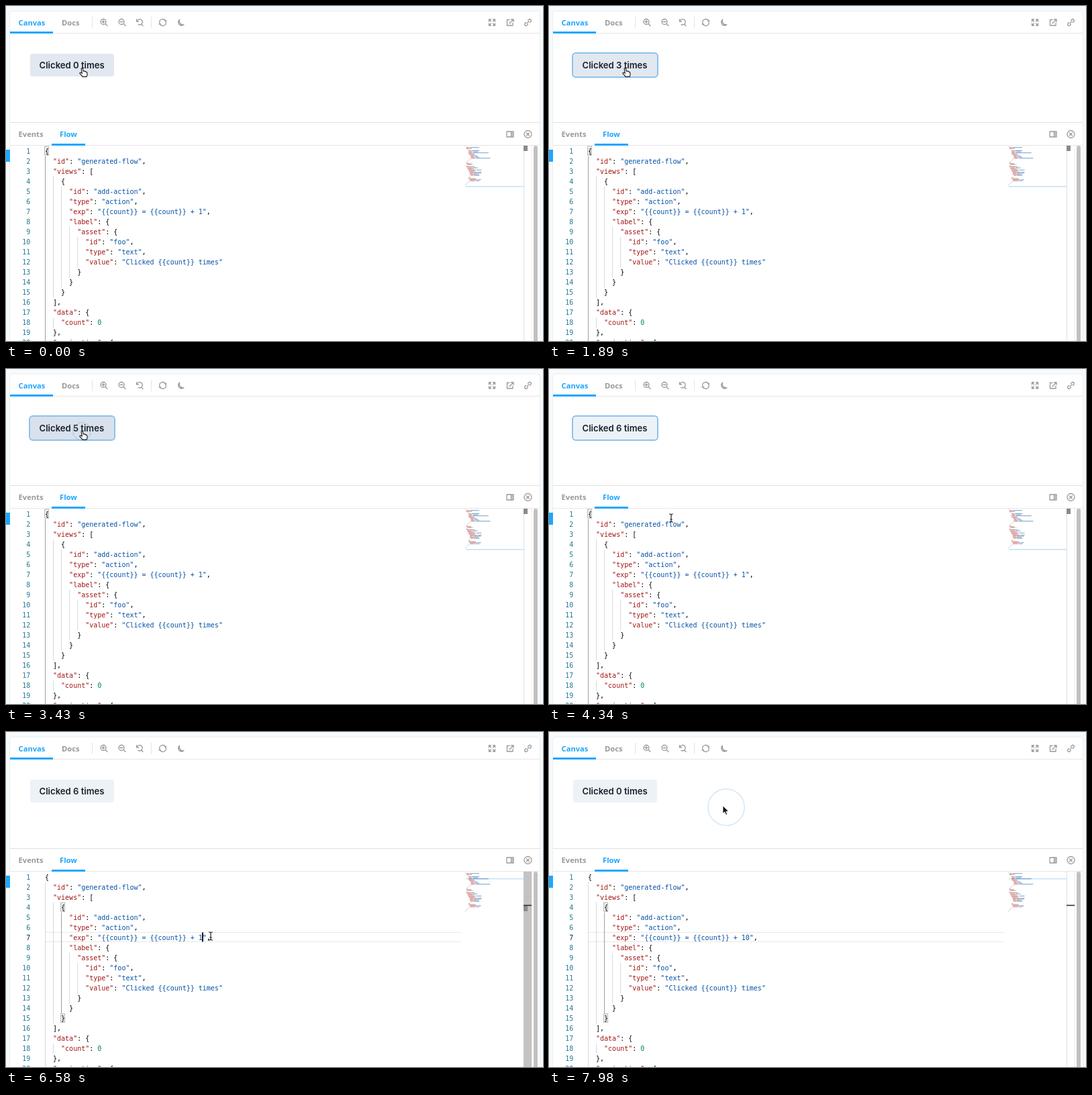
Write an HTML page that moves like this. It is 800 px wide and 499 px high and loops after 8000 ms.

```html
<!DOCTYPE html>
<html lang="en">
<head>
<meta charset="utf-8">
<title>Flow editor</title>
<style>
  html, body { margin: 0; width: 100%; height: 100%; overflow: hidden; background: #f6fafd; }
  svg { display: block; }
  .tab { font: 700 11.2px "Open Sans", sans-serif; fill: #999; }
  .on { fill: #1ea7fd; }
  .label { font: 600 13.1px Inter, sans-serif; fill: #1a202c; }
  .code { font: 10px "DejaVu Sans Mono", monospace; fill: #000; }
  .num { text-anchor: end; fill: #237893; }
  .icon { fill: none; stroke: #999; stroke-width: 1.3; stroke-linecap: round; stroke-linejoin: round; }
</style>
</head>
<body>
<svg id="stage" width="800" height="499" viewBox="0 0 800 499"></svg>
<script>
const LOOP = 8000, CH = 6.02, ROW = 15.05, LEFT = 58, TOP = 208.5;
const PRESSES = [370, 970, 1540, 2170, 2770, 3372];
const CARET_PRESS = 5309, BLUR_PRESS = 7657, TYPED = 6720, RESET = 6860;
const COLORS = { key: '#a31515', str: '#0451a5', num: '#098658', punct: '#000' };

const SOURCE = `{
  "id": "generated-flow",
  "views": [
    {
      "id": "add-action",
      "type": "action",
      "exp": "{{count}} = {{count}} + 1",
      "label": {
        "asset": {
          "id": "foo",
          "type": "text",
          "value": "Clicked {{count}} times"
        }
      }
    }
  ],
  "data": {
    "count": 0
  },
  "navigation": {
    "BEGIN": "FLOW_1",
    "FLOW_1": {
      "startState": "VIEW_1",
      "VIEW_1": {
        "state_type": "VIEW",
        "ref": "add-action",
        "transitions": {
          "*": "END_Done"
        }
      },
      "END_Done": {
        "state_type": "END",
        "outcome": "done"
      }
    }
  }
}`.split('\n');

const stage = document.getElementById('stage');

function add(tag, attrs, parent = stage, text) {
  const el = document.createElementNS('http://www.w3.org/2000/svg', tag);
  for (const k in attrs) el.setAttribute(k, attrs[k]);
  if (text !== undefined) el.textContent = text;
  parent.appendChild(el);
  return el;
}
const rect = (x, y, width, height, fill, more, parent) =>
  add('rect', { x, y, width, height, fill, ...more }, parent);
const write = (x, y, cls, text, parent) => add('text', { x, y, class: cls }, parent, text);
const group = (attrs = {}) => add('g', attrs);
const show = (el, on) => el.setAttribute('visibility', on ? 'visible' : 'hidden');
const icon = (x, y, d) => add('path', { d, class: 'icon', transform: `translate(${x} ${y})` });

// Panel, toolbar and tabs
rect(5.5, 7.5, 790, 500, '#fff', { rx: 4, stroke: '#e9eef2' });
rect(6, 40, 789, 1, '#e6e6e6');
rect(6, 173, 789, 1, '#e0e0e0');
rect(6, 207, 789, 1, '#e6e6e6');
rect(0, 214, 6, 18, '#1ea7fd');
rect(6, 38, 64, 3, '#1ea7fd');
rect(68, 205, 50, 3, '#1ea7fd');
write(18.5, 28.5, 'tab on', 'Canvas');
write(83, 28.5, 'tab', 'Docs');
write(18.5, 195, 'tab', 'Events');
write(80, 195, 'tab on', 'Flow');
rect(128, 16, 1, 17, '#e4e4e4');
rect(216, 16, 1, 17, '#e4e4e4');

const LENS = 'M3 -1A4 4 0 1 1 -5 -1A4 4 0 1 1 3 -1M2 2L5 5M-3 -1H1';
icon(146, 24.5, LENS + 'M-1 -3V1');
icon(173, 24.5, LENS);
icon(199, 24.5, 'M-4.5 -4.5V-1.5H-1.5M-4 -2A4.2 4.2 0 1 1 -2 3M2.5 2.5L5 5');
icon(233.5, 24.5, 'M-4.5 1A4.5 4.5 0 0 1 3.8 -2.4M4.5 -1A4.5 4.5 0 0 1 -3.8 2.4M5.5 -2.5L3.6 -2.2L3.2 -4M-5.5 2.5L-3.6 2.2L-3.2 4');
icon(260, 25, 'M-1.5 -4.8A5 5 0 1 0 5 2.8A5.6 5.6 0 0 1 -1.5 -4.8Z');
icon(724, 24.5, 'M-4.5 -1.5V-4.5H-1.5M1.5 -4.5H4.5V-1.5M4.5 1.5V4.5H1.5M-1.5 4.5H-4.5V1.5M-4 -4L-1.5 -1.5M4 -4L1.5 -1.5M4 4L1.5 1.5M-4 4L-1.5 1.5');
icon(751, 24.5, 'M-1 -4H-4.5V4.5H4V1M1.5 -4.5H5V-1M5 -4.5L-1 1.5');
icon(777.5, 24.5, 'M-1.5 1.5L1.5 -1.5M0 -3L1.7 -4.5A2 2 0 0 1 4.5 -1.7L3 0M0 3L-1.7 4.5A2 2 0 0 1 -4.5 1.7L-3 0');
icon(751, 191, 'M-5 -4H5V4H-5ZM1.5 -4V4M3 -2H3.6M3 0H3.6M3 2H3.6');
icon(777.5, 191, 'M5.5 0A5.5 5.5 0 1 1 -5.5 0A5.5 5.5 0 1 1 5.5 0M-2 -2L2 2M2 -2L-2 2');

// Button
const focusRing = rect(34, 69, 129, 38, '#8ec2ed', { rx: 6 });
const button = rect(36, 71, 125, 34, '#edf2f7', { rx: 4 });
const label = write(49.5, 93, 'label', '');

// Editor decorations
const rowTop = n => TOP + (n - 1) * ROW;
const lineBox = group();
rect(LEFT, 298, 620, 1, '#e8e8e8', {}, lineBox);
rect(LEFT, 312, 620, 1, '#e8e8e8', {}, lineBox);

const guide = (col, from, to, fill = '#d8d8d8', parent) =>
  rect(LEFT + col * CH, rowTop(from), 1, (to - from + 1) * ROW, fill, {}, parent);
guide(0, 2, 20);
guide(2, 4, 15);
guide(4, 5, 14);
guide(6, 9, 13);
guide(8, 10, 12);
guide(2, 18, 18);

function match(col, line, parent) {
  rect(LEFT + col * CH - .5, rowTop(line) + .5, 6, 13, '#e8efe8', { stroke: '#b9b9b9' }, parent);
}
const outer = group(), inner = group();
guide(0, 2, 20, '#a0a0a0', outer);
match(0, 1, outer);
guide(4, 5, 14, '#a0a0a0', inner);
match(4, 4, inner);
match(4, 15, inner);

// Code and minimap
const miniLine = rect(685, 268, 86, 1.6, '#c5e2f8');
const numbers = [];
let expValue;

function tokens(line) {
  return line.trim().match(/"[^"]*"(?=:)|"[^"]*"|\d+|[^"\d]+/g).map((text, i, all) => {
    const quoted = text[0] === '"';
    const kind = quoted ? (all[i + 1] || '')[0] === ':' ? 'key' : 'str'
      : /\d/.test(text) ? 'num' : 'punct';
    return { text, kind };
  });
}

SOURCE.forEach((line, i) => {
  let col = line.search(/\S/);
  const visible = i < 20, y = rowTop(i + 1) + 11;
  const row = visible && write(LEFT + col * CH, y, 'code', '');
  if (visible) numbers.push(write(36.3, y, 'code num', i + 1));
  for (const { text, kind } of tokens(line)) {
    if (visible) {
      const span = add('tspan', { fill: COLORS[kind] }, row, text);
      if (i === 6 && kind === 'str') expValue = span;
    }
    rect(684 + col * .85, 208.6 + i * 1.6, text.trim().length * .85, 1, COLORS[kind],
      { opacity: kind === 'punct' ? .35 : .55 });
    col += text.length;
  }
});
const caret = rect(0, 298.5, 1.8, 14, '#000');

// Scrollbars
rect(771, 208, 1, 291, '#e0e0e0');
rect(783, 208, 1, 291, '#ececec');
const rulerTop = rect(771, 208, 6, 8, '#8a8a8a');
const slider = rect(771, 208, 12, 291, '#c3c3c3');
const rulerMark = rect(771, 259, 6, 8, '#8a8a8a');
const rulerLine = rect(771, 257.5, 12, 1.6, '#333');
rect(786, 208, 6, 300, '#c1c1c1', { rx: 3 });

// Pointer
const ring = add('circle', { fill: 'none', stroke: '#6ba5e6' });
const shape = (d, attrs) => add('path', { d, 'stroke-linejoin': 'round', 'stroke-linecap': 'round', ...attrs });
const pointers = {
  hand: shape('M-.9 .2Q.3 -1.2 1.3 .4L2.2 4.2Q3.5 3.3 4.2 4.5Q5.3 3.9 6 5.2Q7.4 4.9 7.8 6.4L8 9.2Q7.9 10.6 7.1 12.4H1.2Q-.4 10.2 -3 7.6Q-3.4 5.8 -1.6 6.1L.3 7.4Z',
    { fill: '#fff', stroke: '#111', 'stroke-width': 1.1 }),
  arrow: shape('M0 0V11.5L2.7 9L4.7 13.4L6.6 12.6L4.7 8.3H8.4Z',
    { fill: '#111', stroke: '#fff', 'stroke-width': .8 }),
  beam: shape('M-2.5 -6Q0 -6 0 -4.5Q0 -6 2.5 -6M0 -4.5V4.5M-2.5 6Q0 6 0 4.5Q0 6 2.5 6M-1.3 2H1.3',
    { fill: 'none', stroke: '#222', 'stroke-width': 1.2 })
};

const PATH = [
  [0, 113, 93], [3880, 113, 93], [4340, 182, 222], [5000, 293, 304], [5310, 293, 304],
  [5520, 304, 305], [6300, 304, 305], [6500, 305, 304], [7150, 305, 304],
  [7600, 264, 112], [7680, 264, 112], [7950, 259, 110], [LOOP, 259, 110]
];
const clamp = v => Math.max(0, Math.min(1, v));

function pointerAt(t) {
  const i = Math.max(1, PATH.findIndex(k => k[0] > t));
  const [t0, x0, y0] = PATH[i - 1], [t1, x1, y1] = PATH[i];
  const p = (t - t0) / (t1 - t0), e = p * p * (3 - 2 * p);
  return [x0 + (x1 - x0) * e, y0 + (y1 - y0) * e];
}

function drawRing(t) {
  const start = [...PRESSES, CARET_PRESS, BLUR_PRESS].find(s => t >= s && t < s + 340);
  show(ring, start !== undefined);
  if (start === undefined) return;
  const p = (t - start) / 340, a = Math.sin(Math.PI * p ** 1.5);
  const [cx, cy] = pointerAt(start);
  const attrs = { cx, cy, r: 10 + 18 * p, 'stroke-width': 1 + 1.8 * a, opacity: .15 + .7 * a };
  for (const k in attrs) ring.setAttribute(k, attrs[k]);
}

function render(t) {
  const [x, y] = pointerAt(t);
  const hover = x > 36 && x < 161 && y > 71 && y < 105;
  const kind = hover ? 'hand' : y > 207 ? 'beam' : 'arrow';
  for (const k in pointers) show(pointers[k], k === kind);
  pointers[kind].setAttribute('transform', `translate(${x} ${y})`);
  drawRing(t);

  const count = t >= RESET ? 0 : PRESSES.filter(s => t >= s + 80).length;
  const pressed = PRESSES.some(s => t >= s && t < s + 110);
  label.textContent = `Clicked ${count} times`;
  button.setAttribute('fill', pressed ? '#d9e1ec' : hover ? '#e2e8f0' : '#edf2f7');
  show(focusRing, t >= PRESSES[0] && t < CARET_PRESS);

  const editing = t >= CARET_PRESS, typed = t >= TYPED;
  show(outer, !editing);
  show(rulerTop, !editing);
  for (const el of [inner, lineBox, rulerLine]) show(el, editing);
  show(rulerMark, t >= 6300 && t < TYPED + 200);
  show(caret, editing && t < BLUR_PRESS);
  caret.setAttribute('x', typed ? 298 : 292);
  expValue.textContent = `"{{count}} = {{count}} + ${typed ? 10 : 1}"`;
  numbers[6].style.fill = editing ? '#0b216f' : '';
  miniLine.setAttribute('y', editing ? 217.8 : 268);
  slider.setAttribute('opacity', clamp((t - 4400) / 100) * clamp((7900 - t) / 500));
}

function tick() {
  render(performance.now() % LOOP);
  requestAnimationFrame(tick);
}
tick();
</script>
</body>
</html>
```
